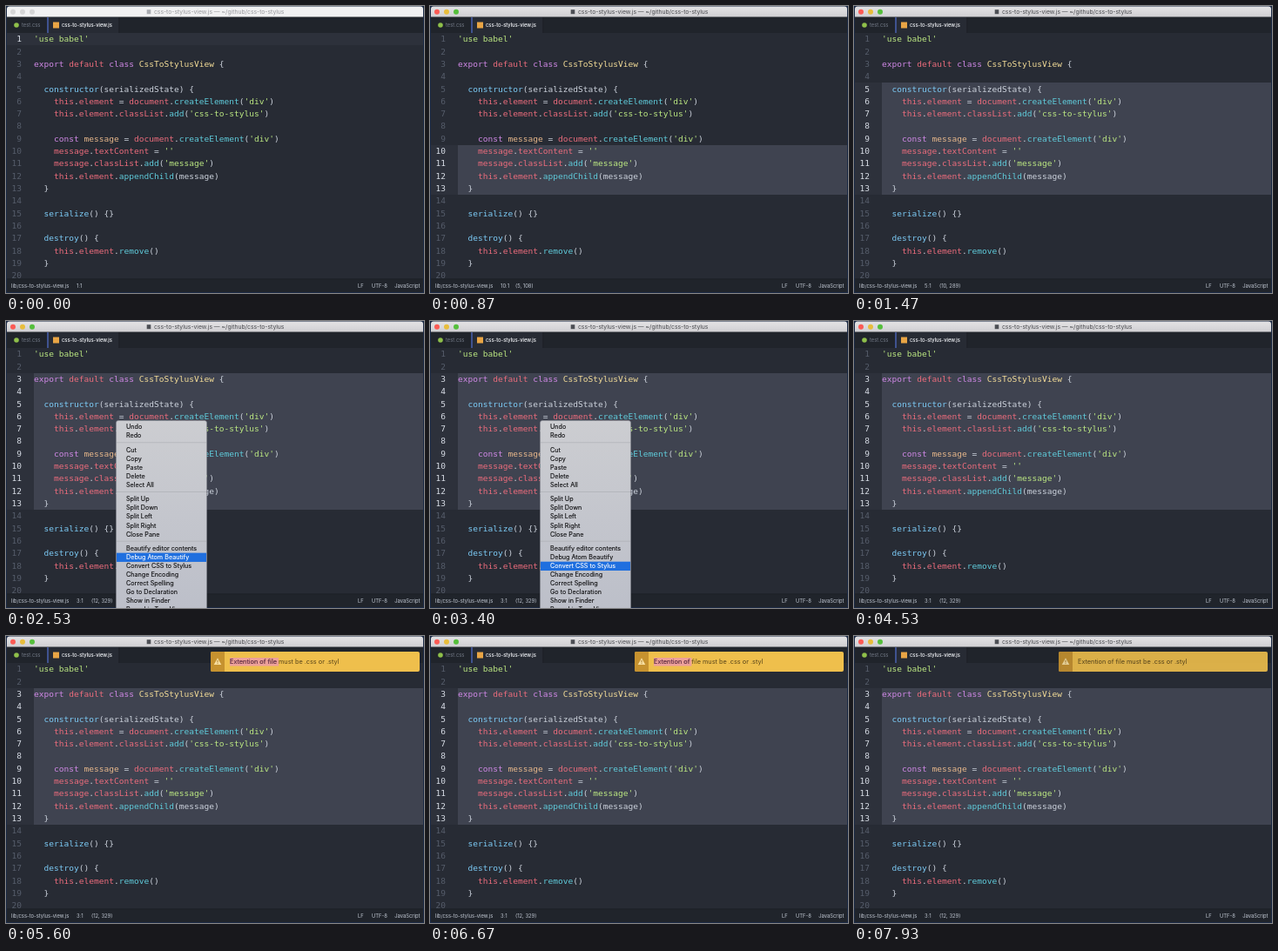
An HTML page for the animation above (8000 ms loop, 480 by 330 pixels).

```html
<!DOCTYPE html>
<html lang="en">
<head>
<meta charset="utf-8">
<title>Editor</title>
<style>
  html, body { margin: 0; width: 100%; height: 100%; overflow: hidden; background: #1b2a45; }
  svg { display: block; width: 480px; height: 330px; }
  text { white-space: pre; fill: #c3cad5; font-family: Inter, "Open Sans", sans-serif; }
  .code text { font: 9.56px "DejaVu Sans Mono", monospace; fill: #ccd2dc; }
  .code .num { fill: #565d6b; text-anchor: end; }
  .code .num.lit { fill: #d8dde6; }
  .code .p { fill: #d088e6; } .code .y { fill: #f3dc97; } .code .b { fill: #7ccbf6; }
  .code .r { fill: #ec6c7c; } .code .c { fill: #5fcbda; } .code .g { fill: #bce882; } .code .o { fill: #e8b88b; }
  .small { font-size: 5.85px; }
  .title { font-size: 6.78px; }
  .menu text { font-size: 7.2px; fill: #0c0c0e; stroke: #0c0c0e; stroke-width: .12px; }
  .menu text.on { fill: #fff; stroke: #fff; }
  .note text { font-size: 7.3px; fill: #59451a; }
</style>
</head>
<body>
<svg viewBox="0 0 480 330">
  <defs>
    <linearGradient id="bar" x2="0" y2="1">
      <stop offset="0" stop-color="#e4e3e5"/><stop offset="1" stop-color="#d0cfd2"/>
    </linearGradient>
    <linearGradient id="sheet" x2="0" y2="1">
      <stop offset="0" stop-color="#cccdd1"/><stop offset="1" stop-color="#bcbfc9"/>
    </linearGradient>
    <clipPath id="pane"><rect x="1" y="31" width="478" height="283"/></clipPath>
    <clipPath id="marked"><rect id="markClip" x="257" y="20" width="0" height="20"/></clipPath>
  </defs>

  <rect x="1" y="1" width="478" height="328" rx="3" fill="#272b34"/>
  <rect x="1" y="12" width="478" height="19" fill="#20242b"/>
  <path id="titleBar" d="M1 12.5V3.5q0-3 3-3H476q3 0 3 3V12.5z"/>
  <g id="lights">
    <circle cx="8" cy="6.7" r="3"/><circle cx="19" cy="6.7" r="3"/><circle cx="30" cy="6.7" r="3"/>
  </g>
  <rect id="docIcon" x="161.7" y="4.2" width="4.6" height="5"/>
  <text id="title" class="title" x="170" y="9.3">css-to-stylus-view.js — ~/github/css-to-stylus</text>

  <rect x="48" y="13" width="82" height="18" fill="#272b34"/>
  <rect x="47.4" y="13" width="1.2" height="18" fill="#5470cf"/>
  <rect x="129.5" y="13" width=".6" height="18" fill="#181a1f"/>
  <circle cx="12" cy="22" r="2.8" fill="#8fc04a"/>
  <rect x="54" y="18.5" width="7" height="7" fill="#e9a545"/>
  <text class="small" x="18" y="24" style="fill:#737a87">test.css</text>
  <text class="small" x="64" y="24" style="fill:#f0f2f6;stroke:#f0f2f6;stroke-width:.12px">css-to-stylus-view.js</text>

  <g class="code" clip-path="url(#pane)">
    <rect id="gutter" x="1" width="31" fill="#2d313b"/>
    <rect id="selection" x="32" width="447" fill="#3f4350"/>
    <g id="lines"></g>
  </g>

  <rect x="1" y="314" width="478" height="15" fill="#20242b"/>
  <rect x="1" y="313.6" width="478" height=".6" fill="#181a1f"/>
  <g class="small">
    <text x="6" y="324.2">lib/css-to-stylus-view.js</text>
    <text id="position" x="81" y="324.2"></text>
    <text id="count" x="98" y="324.2"></text>
    <text x="404" y="324.2">LF</text>
    <text x="420" y="324.2">UTF-8</text>
    <text x="475.5" y="324.2" text-anchor="end">JavaScript</text>
  </g>

  <g id="menu" class="menu">
    <rect x="126.5" y="114.5" width="104" height="220" rx="2.5" fill="url(#sheet)" stroke="#8b8d94" stroke-width=".5"/>
    <rect id="hover" x="127" width="103" height="10.3" fill="#1f6fdf"/>
  </g>

  <g id="note" class="note">
    <rect x="235" y="18" width="240" height="23" rx="2" fill="#efbf4c"/>
    <path d="M251 18H237q-2 0-2 2V39q0 2 2 2H251z" fill="#c6922f"/>
    <path d="M243 25.3L247.3 33H238.7z" fill="#f8dfa0"/>
    <path d="M243 27.8V30.4M243 31.2V32.1" stroke="#a87822" stroke-width=".9"/>
    <rect id="mark" x="257" y="25" width="0" height="9.5" fill="#eda09a"/>
    <text id="message" x="257" y="32.2">Extention of file must be .css or .styl</text>
    <text x="257" y="32.2" clip-path="url(#marked)" style="fill:#7b3763">Extention of file must be .css or .styl</text>
  </g>
</svg>
<script>
const LOOP = 8000, ROW = 14.32, TOP = 31, ANCHOR = 14, ITEM = 10.05;
const $ = id => document.getElementById(id);
const ramp = (t, from, to) => Math.min(1, Math.max(0, (t - from) / (to - from)));
const show = (id, on) => $(id).style.display = on ? '' : 'none';

function add(parent, tag, attrs, text = '') {
  const node = document.createElementNS('http://www.w3.org/2000/svg', tag);
  for (const key in attrs) node.setAttribute(key, attrs[key]);
  node.textContent = text;
  return parent.appendChild(node);
}

// Between tildes: a colour class letter followed by the coloured text.
const source = `~g'use babel'~

~pexport~ ~rdefault~ ~pclass~ ~yCssToStylusView~ {

  ~bconstructor~(serializedState) {
    ~rthis~.~relement~ = ~rdocument~.~ccreateElement~(~g'div'~)
    ~rthis~.~relement~.~rclassList~.~cadd~(~g'css-to-stylus'~)

    ~pconst~ ~omessage~ = ~rdocument~.~ccreateElement~(~g'div'~)
    ~rmessage~.~rtextContent~ = ~g''~
    ~rmessage~.~rclassList~.~cadd~(~g'message'~)
    ~rthis~.~relement~.~cappendChild~(message)
  }

  ~bserialize~() {}

  ~bdestroy~() {
    ~rthis~.~relement~.~cremove~()
  }
`.split('\n');

const lengths = [], numbers = [];
source.forEach((line, i) => {
  const y = TOP + i * ROW + 10.25;
  numbers.push(add($('lines'), 'text', { x: 18, y, class: 'num' }, i + 1));
  const row = add($('lines'), 'text', { x: 32, y });
  line.split('~').forEach((part, n) => {
    if (n % 2) add(row, 'tspan', { class: part[0] }, part.slice(1));
    else row.append(part);
  });
  lengths.push(row.textContent.length);
});

const groups = [
  ['Undo', 'Redo'],
  ['Cut', 'Copy', 'Paste', 'Delete', 'Select All'],
  ['Split Up', 'Split Down', 'Split Left', 'Split Right', 'Close Pane'],
  ['Beautify editor contents', 'Debug Atom Beautify', 'Convert CSS to Stylus', 'Change Encoding',
    'Correct Spelling', 'Go to Declaration', 'Show in Finder', 'Reveal in Tree View']
];
const items = [];
let itemY = 121.6;
groups.forEach((group, g) => {
  if (g) {
    add($('menu'), 'rect', { x: 127, y: itemY - 2.2, width: 103, height: .7, fill: '#adafb6' });
    itemY += 6.4;
  }
  for (const label of group) {
    items.push({ y: itemY, node: add($('menu'), 'text', { x: 138, y: itemY + 2.6 }, label) });
    itemY += ITEM;
  }
});

function drawWindow(focused) {
  $('titleBar').setAttribute('fill', focused ? 'url(#bar)' : '#f1f1f2');
  const colors = focused ? ['#fb5b55', '#e8bd3c', '#55bf3c'] : ['#d5d5d6', '#d5d5d6', '#d5d5d6'];
  [...$('lights').children].forEach((dot, i) => dot.setAttribute('fill', colors[i]));
  $('docIcon').setAttribute('fill', focused ? '#4d4f55' : '#a9abb0');
  $('title').style.fill = focused ? '#47484c' : '#98999d';
}

function drawSelection(t, focused) {
  const first = !focused ? 1 : Math.max(3, ANCHOR - Math.max(0, Math.floor((t - 270) / 130)));
  const selected = focused && first < ANCHOR;
  const last = selected ? ANCHOR - 1 : first;
  const top = Math.round(TOP + (first - 1) * ROW);
  const bottom = Math.round(TOP + last * ROW);
  for (const id of ['gutter', 'selection']) {
    $(id).setAttribute('y', top);
    $(id).setAttribute('height', bottom - top);
  }
  $('selection').setAttribute('fill', selected ? '#3f4350' : '#2d313b');
  numbers.forEach((n, i) => n.classList.toggle('lit', i + 1 >= first && i + 1 <= last));
  $('position').textContent = first + ':1';
  const chars = lengths.slice(first - 1, last).reduce((sum, n) => sum + n + 1, 0);
  $('count').textContent = selected ? `(${ANCHOR - first + 1}, ${chars})` : '';
}

function drawMenu(t) {
  show('menu', t >= 1930 && t < 3870);
  $('menu').setAttribute('opacity', 1 - ramp(t, 3660, 3870));
  let index = Math.min(13, Math.floor((t - 2000) / 40));
  if (t >= 2665) index = 14;
  if (t >= 3530 && t < 3600) index = -1;
  items.forEach((item, i) => item.node.classList.toggle('on', i === index));
  show('hover', index >= 0);
  if (index >= 0) $('hover').setAttribute('y', items[index].y - 4.8);
}

function drawNote(t) {
  show('note', t >= 4920);
  const slide = 1 - (1 - ramp(t, 4900, 5130)) ** 2;
  $('note').setAttribute('transform', `translate(${245 * (1 - slide)} 0)`);
  $('note').setAttribute('opacity', 1 - .1 * ramp(t, 7800, 7930));
  const label = $('message');
  const total = label.textContent.length;
  const chars = Math.round(total * (ramp(t, 5270, 6000) - ramp(t, 6130, 6930)));
  const width = chars && t >= 4920 ? label.getSubStringLength(0, chars) : 0;
  $('mark').setAttribute('width', width);
  $('markClip').setAttribute('width', width);
}

function draw(now) {
  const t = now % LOOP, focused = t >= 130;
  drawWindow(focused);
  drawSelection(t, focused);
  drawMenu(t);
  drawNote(t);
}

const start = performance.now();
function tick() {
  draw(performance.now() - start);
  requestAnimationFrame(tick);
}
tick();
</script>
</body>
</html>
```
